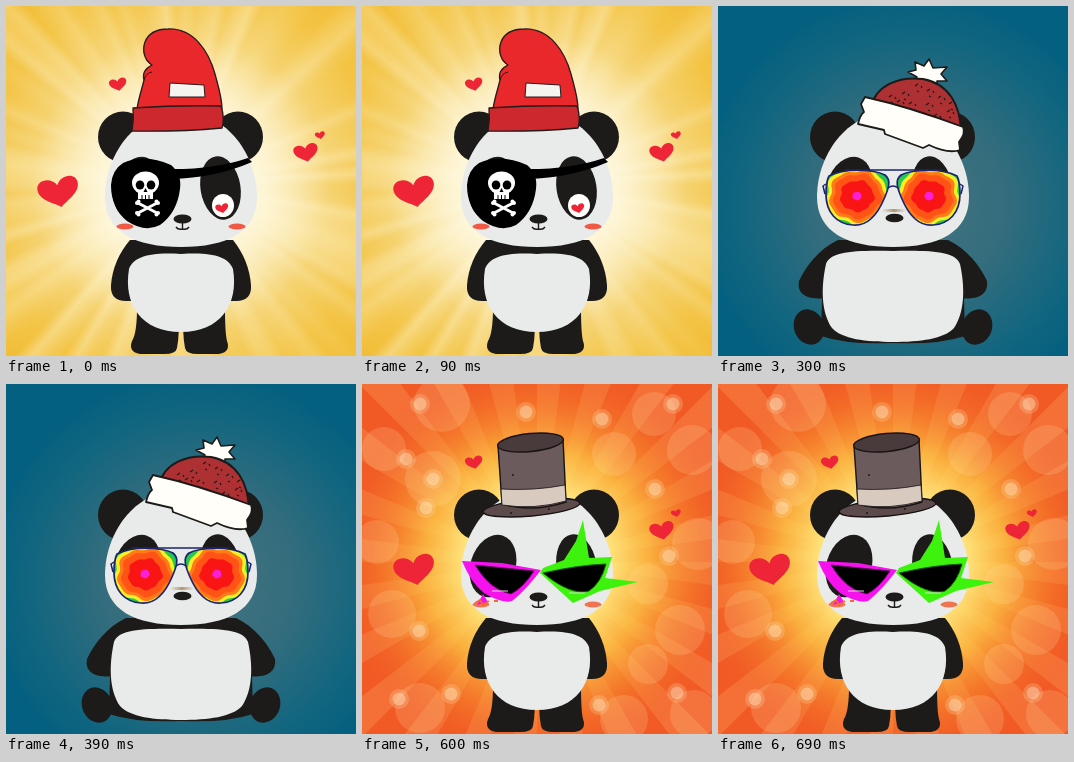
An HTML page with a canvas for the animation above (750 ms loop, 350 px wide and 350 px high).

```html
<!DOCTYPE html>
<html lang="en">
<head>
<meta charset="utf-8">
<title>Panda outfits</title>
<style>
  html, body { margin: 0; width: 100%; height: 100%; overflow: hidden; }
  canvas { display: block; width: 350px; height: 350px; }
</style>
</head>
<body>
<canvas id="stage" width="350" height="350"></canvas>
<script>
const ctx = document.getElementById('stage').getContext('2d');
const INK = '#1c1b19', FUR = '#e9ebea', RED = '#ee2536', TAU = Math.PI * 2;
const HOLD = 150;

function paint(path, fill, stroke, width = 1.5) {
  if (fill) { ctx.fillStyle = fill; ctx.fill(path); }
  if (stroke) { ctx.strokeStyle = stroke; ctx.lineWidth = width; ctx.stroke(path); }
}
const shape = (d, ...style) => paint(new Path2D(d), ...style);

function oval(x, y, rx, ry, fill, turn = 0, stroke, width) {
  const p = new Path2D();
  p.ellipse(x, y, rx, ry, turn, 0, TAU);
  paint(p, fill, stroke, width);
}

function at(x, y, draw, { turn = 0, sx = 1, sy = sx } = {}) {
  ctx.save();
  ctx.translate(x, y);
  ctx.rotate(turn);
  ctx.scale(sx, sy);
  draw();
  ctx.restore();
}

function clipped(d, draw) {
  ctx.save();
  ctx.clip(new Path2D(d));
  draw();
  ctx.restore();
}

function random(seed) {
  return () => (seed = (seed * 16807) % 2147483647) / 2147483647;
}

// ---------- backgrounds ----------
function cover(gradient, stops) {
  stops.forEach(([pos, color]) => gradient.addColorStop(pos, color));
  ctx.fillStyle = gradient;
  ctx.fillRect(0, 0, 350, 350);
}
const glow = (x, y, radius, stops) => cover(ctx.createRadialGradient(x, y, 0, x, y, radius), stops);

function ray(x, y, angle, half, color) {
  ctx.fillStyle = color;
  ctx.beginPath();
  ctx.moveTo(x, y);
  ctx.lineTo(x + 300 * Math.cos(angle - half), y + 300 * Math.sin(angle - half));
  ctx.lineTo(x + 300 * Math.cos(angle + half), y + 300 * Math.sin(angle + half));
  ctx.fill();
}

function sunshine() {
  glow(175, 178, 250, [[0, '#fffdf0'], [.3, '#fbeec0'], [.55, '#f6d67a'], [.8, '#f3c445'], [1, '#f1bc33']]);
  const rnd = random(41), count = 110;
  const soft = Array.from({ length: count }, (_, i) =>
    [i / count, `rgba(255,246,210,${(i ? rnd() ** 2 * .4 : 0).toFixed(3)})`]);
  cover(ctx.createConicGradient(0, 175, 178), [...soft, [1, 'rgba(255,246,210,0)']]);
  glow(175, 178, 150, [[0, '#fffdf4'], [.55, 'rgba(255,250,230,.6)'], [1, 'rgba(255,250,225,0)']]);
}

function party() {
  ctx.fillStyle = '#f15a25';
  ctx.fillRect(0, 0, 350, 350);
  for (let i = 0; i < 24; i++) ray(175, 178, (i + .25) * TAU / 24, TAU / 96, 'rgba(255,190,120,.22)');
  glow(175, 178, 205, [[0, '#fffbd8'], [.35, 'rgba(255,236,130,.95)'], [.55, 'rgba(253,203,70,.76)'],
    [.78, 'rgba(248,145,45,.38)'], [1, 'rgba(241,90,37,0)']]);
  const sparks = [[58, 20], [164, 28], [44, 75], [311, 20], [293, 105], [71, 95], [64, 124], [307, 172],
    [57, 247], [37, 315], [89, 310], [237, 321], [315, 309], [240, 35]];
  const bubbles = [[80, 20, 28], [22, 65, 22], [292, 30, 22], [330, 66, 25], [71, 95, 28], [15, 158, 22],
    [336, 160, 26], [286, 200, 20], [30, 230, 24], [318, 246, 25], [286, 280, 20], [58, 324, 25],
    [262, 335, 24], [332, 330, 24], [252, 70, 22]];
  bubbles.forEach(([x, y, r]) => oval(x, y, r, r, 'rgba(255,225,170,.18)'));
  sparks.forEach(([x, y]) => {
    oval(x, y, 10, 10, 'rgba(255,230,180,.22)');
    oval(x, y, 6.5, 6.5, 'rgba(255,240,205,.38)');
  });
}

const teal = () => glow(192, 198, 210, [[0, '#457580'], [.45, '#346d7d'], [.8, '#12667f'], [1, '#046080']]);
const green = () => glow(178, 180, 190, [[0, '#6f8062'], [.4, '#69804b'], [.75, '#5a8220'], [1, '#518000']]);

// ---------- panda ----------
function standing() {
  shape('M131 302 L172 302 Q174 327 171 342 Q170 348 158 348 L134 348 Q122 346 126 335 Q131 327 131 302Z' +
    'M219 302 L178 302 Q176 327 179 342 Q180 348 192 348 L213 348 Q225 346 221 335 Q219 327 219 302Z', INK);
  shape('M124 234 L227 234 Q243 254 245 279 Q246 295 230 295 L120 295 Q104 295 105 279 Q107 254 124 234Z', INK);
  shape('M175 248 C205 246 222 250 227 263 C233 299 214 326 175 326 C136 326 117 299 123 263 C128 250 145 246 175 248Z', FUR);
}

function sitting() {
  shape('M120 234 L230 234 C249 243 262 260 269 275 C271 291 256 294 240 292 L110 292 C94 294 78 291 81 275 C88 260 101 243 120 234Z', INK);
  shape('M104 292 L246 292 L247 330 Q220 339 175 337 Q130 339 103 330Z', INK);
  oval(91, 321, 15, 18, INK, -.35);
  oval(259, 321, 15, 18, INK, .35);
  shape('M175 245 C215 244 238 246 242 258 C247 281 247 306 236 322 C226 333 202 336 175 336 C148 336 124 333 114 322 C103 306 103 281 108 258 C112 246 135 244 175 245Z', FUR);
}

function head(cheeks, smile = true) {
  oval(117, 131, 25, 25.5, INK);
  oval(232, 131, 25, 25.5, INK);
  shape('M175 106 C223 106 251 151 251 191 C251 226 221 241 175 241 C129 241 99 226 99 191 C99 151 127 106 175 106Z', FUR);
  oval(131, 182, 22.5, 32, INK, .3);
  oval(214.5, 182, 20, 32, INK, -.16);
  if (cheeks) [119, 231].forEach(x => oval(x, 220.5, 8.5, 3, cheeks));
  if (!smile) return;
  oval(176.5, 213, 9, 4.5, INK);
  shape('M176.5 216 L176.5 223 M170 221 Q172 224 176.5 223 Q181 224 183 221', null, INK, 1.4);
}

// ---------- hearts ----------
function heart(x, y, size) {
  at(x, y, () => shape('M0 .45 C-.16 .3 -.5 .16 -.5 -.13 C-.5 -.42 -.12 -.44 0 -.16 C.12 -.44 .5 -.42 .5 -.13 C.5 .16 .16 .3 0 .45Z', RED),
    { turn: -.2, sx: size, sy: size * .88 });
}
function hearts() {
  heart(52.5, 185, 41);
  heart(112, 78, 17.5);
  heart(300, 146, 24.5);
  heart(314, 129, 10);
}

// ---------- hats ----------
function redCap() {
  shape('M131 103 C133 90 136 83 138 74 C136 67 140 62 146 59 C138 54 136 44 139 36 C143 26 153 23 162 23 C188 22 203 46 209 68 C213 83 216 92 216 103Z', '#e8282b', '#25191a', 1.3);
  shape('M138 74 Q140 67 146 66 M146 59 Q142 57 140 53', null, '#25191a', 1);
  shape('M127 102 Q172 99 215 100 Q219 112 216 122 Q172 126 126 125 Q128 114 127 102Z', '#cc282d', '#25191a', 1.3);
  shape('M164 77 L198 79 L199 91 L163 91Z', '#f6f4ef', '#25191a', 1);
}

function bobbleHat() {
  shape('M195 76 L199 71 L190 66 L198 64 L197 56 L206 60 L211 53 L215 62 L229 61 L223 68 L229 75 L219 75 L219 80Z', '#fffef8', INK, 1.6);
  shape('M153 101 C158 79 181 70 205 73 C232 78 242 100 243 125Z', '#ad3033', INK, 2);
  const dots = [[171, 91], [184, 88], [197, 80], [209, 85], [220, 92], [229, 106], [208, 99], [191, 98], [179, 96], [216, 110], [231, 98]];
  dots.forEach(([x, y]) => shape(`M${x} ${y} l3 -2 m3 2 l1 2 m-5 3 l2 1`, null, INK, 1.2));
  shape('M147 91 Q192 101 245 121 Q248 127 241 136 L242 144 Q230 148 211 139 L205 142 L167 128 L166 124 L140 118 Q142 109 146 106 L143 98Z', '#fffef8', INK, 1.8);
}

function fedora() {
  shape('M111 120 Q112 114 131 115 Q175 121 213 115 Q243 117 243 125 Q238 132 218 130 Q170 125 125 124 Q111 125 111 120Z', '#4f4f67', '#111', 2);
  shape('M129 116 L155 81 Q163 74 169 80 L174 88 Q178 77 188 80 Q197 84 202 94 L212 117 Q172 122 129 116Z', '#4b4a62', '#111', 2);
  shape('M134 107 Q172 112 208 108 L212 117 Q172 122 129 116Z', '#72748b', '#111', 1.2);
  shape('M174 88 Q176 92 181 95 M184 86 Q188 88 190 93', null, '#23232c', 1.3);
}

function topHat() {
  oval(169.5, 123.5, 48.5, 8.5, '#5d4a4b', -.09, '#181314', 1.4);
  shape('M136 62 L140 120 Q171 129 204 118 L201 55Z', '#6b5b5d', '#181314', 1.4);
  shape('M139 105 Q172 107 203 101 L204 117 Q172 126 140 121Z', '#d8cabf', '#181314', .8);
  oval(168.5, 58.5, 33, 9, '#493a3c', -.1, '#181314', 1.4);
  [[151, 91], [149, 129], [187, 125]].forEach(([x, y]) => oval(x, y, .9, .9, '#181314'));
}

// ---------- eyewear ----------
function eyePatch() {
  shape('M160 163 Q207 164 242 152 L246 156 Q209 172 165 173Z', '#000');
  shape('M117 157 Q139 147 165 159 Q176 168 174 183 Q171 207 154 219 Q139 227 121 215 Q105 202 105 179 Q106 164 117 157Z', '#000');
  oval(139.5, 177, 13.5, 11.5, '#fff');
  ctx.fillStyle = '#fff';
  ctx.fillRect(132, 184, 15, 9);
  oval(134, 179, 4.3, 4.5, '#000');
  oval(145, 179, 4.3, 4.5, '#000');
  shape('M139.5 182 L141.5 186 L137.5 186Z M135.5 189 v5 h1 v-5Z M139 189 v5 h1 v-5Z M142.5 189 v5 h1 v-5Z', '#000');
  shape('M132 197 L151 207 M151 197 L132 207', null, '#fff', 3);
  [[131, 197], [132.5, 195.5], [152, 197], [150.5, 195.5], [131, 207], [132.5, 208.5], [152, 207], [150.5, 208.5]]
    .forEach(([x, y]) => oval(x, y, 2, 2, '#fff'));
  oval(217, 199.5, 11, 11.5, '#fffefa');
  heart(216, 202, 13);
}

const FLAME = 'M-28 8 Q-23 12 -19 8 Q-15 2 -20 -6 Q-9 -3 -9 7 Q-3 1 -2 -6 Q-2 -14 4 -19 Q3 -11 8 -5 Q10 0 8 6 Q15 0 13 -9 Q21 -2 18 8 Q23 5 23 -1 Q30 10 26 30 L-26 30Z';
function fireGlasses() {
  [134, 216].forEach(x => at(x, 190, () => {
    oval(0, 0, 30, 30, '#000');
    clipped('M-29 0 A29 29 0 0 1 29 0 A29 29 0 0 1 -29 0Z', () => {
      shape(FLAME, '#f0231d');
      at(0, 9, () => shape(FLAME, '#ff8a16'), { sx: .86, sy: .82 });
      at(1, 14, () => shape(FLAME, '#ffe33b'), { sx: .74, sy: .68 });
      at(2, 24, () => shape(FLAME, '#f9501c'), { sx: .4, sy: .5 });
    });
    oval(0, 0, 29.5, 29.5, null, 0, '#f8d90f', 3.2);
  }));
  shape('M163 190 Q175 186 187 190', null, '#f8d90f', 3.5);
  shape('M97 181 h8 M95 185.5 h9 M97 190 h7 M245 181 h8 M246 185.5 h8 M246 190 h7', null, '#f8d90f', 2.3);
}

function blob(r, color) {
  const p = new Path2D();
  for (let i = 0; i <= 90; i++) {
    const a = i / 90 * TAU, k = r * (1 + .05 * Math.sin(5 * a + 1) + .035 * Math.sin(9 * a));
    p.lineTo(k * 1.08 * Math.cos(a), k * Math.sin(a));
  }
  paint(p, color);
}
function heatGlasses() {
  const lens = 'M-28 -20 C-13 -28 16 -27 28 -21 C35 -16 31 -6 27 3 C19 22 8 30 -4 29 C-20 28 -31 17 -31 -2 Q-31 -14 -28 -20Z';
  [1, -1].forEach(side => at(175 - side * 36, 190, () => {
    clipped(lens, () => {
      ctx.fillStyle = '#1687b5';
      ctx.fillRect(-40, -40, 80, 80);
      [[33, '#27c94a'], [29, '#f8ef25'], [25.5, '#ff7a18'], [22, '#ff5415'], [15.5, '#fa1515'], [4.2, '#fb20d8']]
        .forEach(([r, color]) => blob(r, color));
    });
    shape(lens, null, '#1b2470', 1.7);
  }, { sx: side, sy: 1 }));
  shape('M126 164 H224 M170 182 Q175 178 180 182 M108 178 L105 180 L107 188 M242 178 L245 180 L243 188', null, '#1b2470', 1.5);
  const shade = ctx.createLinearGradient(164, 0, 188, 0);
  shade.addColorStop(0, 'rgba(150,115,60,0)');
  shade.addColorStop(.5, 'rgba(150,115,60,.7)');
  shade.addColorStop(1, 'rgba(150,115,60,0)');
  ctx.fillStyle = shade;
  ctx.fillRect(164, 203, 24, 3);
  oval(176.5, 212, 9, 4.3, INK);
}

function pineappleGlasses() {
  [140, 209].forEach(x => at(x, 161, () => {
    [1, -1].forEach(side => at(0, 0, () => {
      shape('M-3 5 Q-17 5 -22 -6 Q-13 -8 -6 0Z', '#2f6f55', '#000', 2.6);
      shape('M-3 5 Q-15 -4 -16 -18 Q-6 -13 -2 -2Z', '#2f6f55', '#000', 2.6);
    }, { sx: side, sy: 1 }));
    shape('M-5 5 Q-8 -9 0 -22 Q8 -9 5 5Z', '#7d8f3f', '#000', 2.6);
  }));
  const lens = 'M-28 -19 L25 -19 Q32 -15 31 -4 Q29 14 17 23 L-14 23 Q-29 15 -29 -4Z';
  [1, -1].forEach(side => at(176 - side * 36, 191, () => {
    shape(lens, '#3b5264');
    clipped(lens, () => at(0, 0, () => shape('M-27 9 L4 -20 M-20 18 L25 -19', null, '#82949e', 4.5), { sx: side, sy: 1 }));
    shape(lens, null, '#000', 5.5);
  }, { sx: side, sy: 1 }));
  const frame = 'M106 190 V171 L115 163 H162 L172 177 H180 L190 163 H237 L246 171 V190';
  shape('M106 184 v12 M246 184 v12', null, '#000', 10);
  shape(frame, null, '#000', 11.5);
  shape(frame, null, '#f5ea3a', 5.5);
  shape('M106 188 v6 M246 188 v6 M134 166 h12 M203 166 h12', null, '#d9692f', 5);
  shape('M215 208 Q227 207 229 195 M205 207 h5', null, '#000', 3.2);
}

function starGlasses() {
  shape('M100 177 L140 179 L179 186 Q164 206 150 217 Q140 220 122 209 Q109 199 100 177Z', '#f512ed');
  shape('M113 181 L172 187 Q161 204 149 210 Q128 206 113 181Z', '#000', '#65105f', 1);
  shape('M115 221 L121 210 L126 218Z', '#f512ed');
  shape('M113 219 l5 -3 l3 5 l6 -4 M132 217 h4', null, '#f26a2b', 1.8);
  shape('M221 136 L227 174 L250 173 L243 194 L276 198 L238 207 L211 219 L178 189 L181 184 L202 176 L214 157Z', '#3df20c');
  shape('M181 189 Q216 181 244 180 Q239 199 227 207 Q209 212 181 189Z', '#000', '#155c09', 1);
  shape('M130 207 h16 M207 209 h16', null, '#d7d9d5', 1);
}

// ---------- bamboo ----------
function bamboo() {
  shape('M94 283 Q82 257 57 239 Q42 226 12 216 M68 248 Q54 236 39 234', null, '#84a04a', 2.4);
  const leaves = [[21, 217, 10, .2], [35, 215, 10, 1.05], [31, 233, 12, -.25], [56, 233, 9, 1.1],
    [73, 239, 10, -.95], [49, 248, 10, -.05], [28, 236, 6, -.3], [58, 282, 8, .75], [53, 337, 11, .05]];
  leaves.forEach(([x, y, size, turn]) => at(x, y, () => shape('M-1 0 Q0 -.5 1 0 Q0 .5 -1 0Z', '#8ca74c'), { turn, sx: size }));
}

const scenes = [
  () => { sunshine(); hearts(); standing(); head('#ef5a45'); redCap(); eyePatch(); },
  () => { teal(); sitting(); head(); bobbleHat(); fireGlasses(); bamboo(); },
  () => { teal(); sitting(); head(null, false); bobbleHat(); heatGlasses(); },
  () => { green(); standing(); head('#ef7443'); fedora(); pineappleGlasses(); },
  () => { party(); hearts(); standing(); head('#ef7550'); topHat(); starGlasses(); }
];

ctx.lineJoin = 'round';
let shown = -1;
function tick() {
  const index = Math.floor(performance.now() / HOLD) % scenes.length;
  if (index !== shown) scenes[shown = index]();
  requestAnimationFrame(tick);
}
tick();
</script>
</body>
</html>
```
